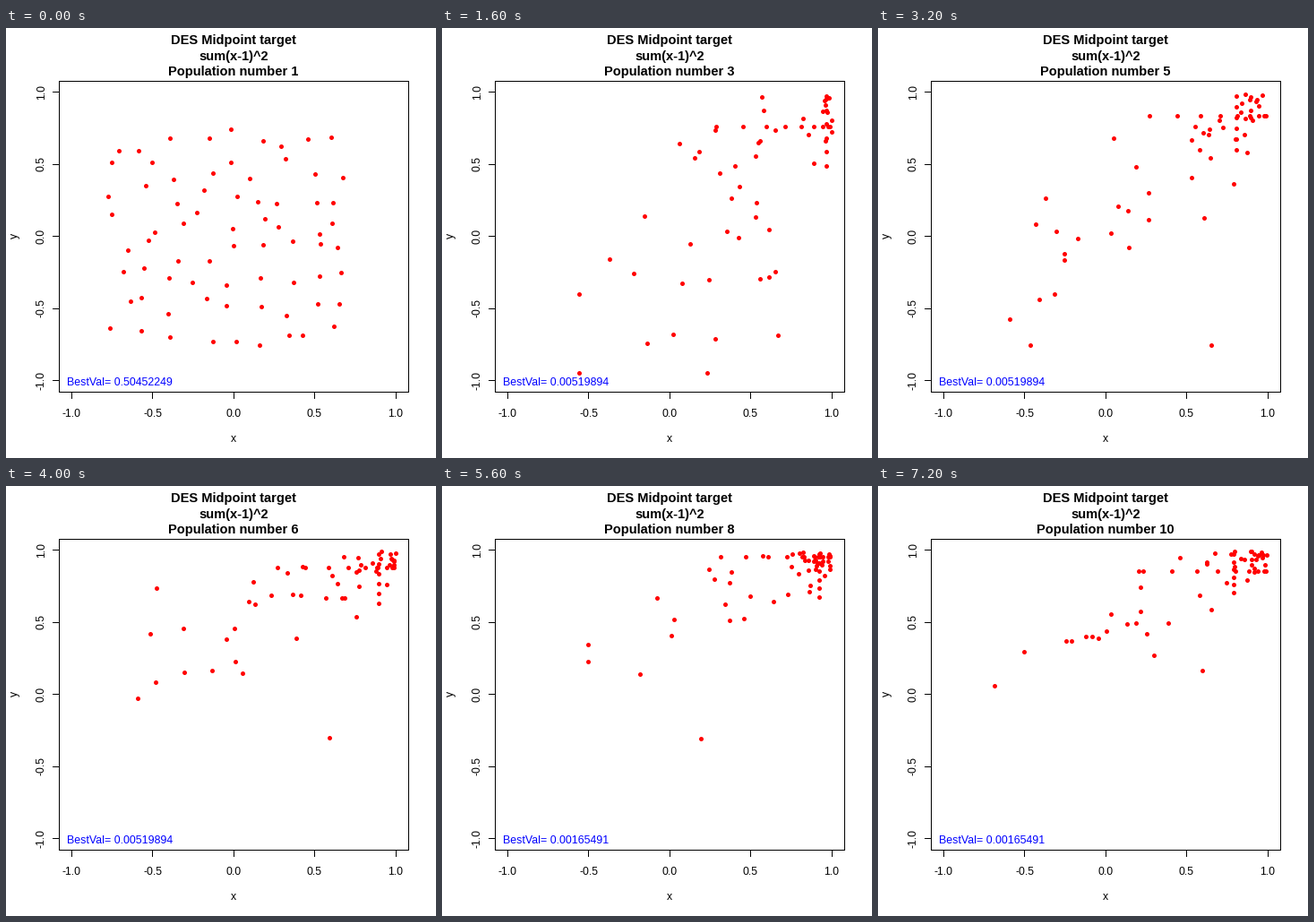
These frames come from a looping animation (480 by 480 pixels, 8 s). A matplotlib script:

```python
import numpy as np
import matplotlib.pyplot as plt
from matplotlib.animation import FuncAnimation

SIZE = 480
LEFT, RIGHT, TOP, BOTTOM = 59, 449, 59, 406
GOAL = np.array([434, 72])
plt.rcParams["font.family"] = "Liberation Sans"

# per generation: the best point, the leftmost point and one stray
KEYS = [
    ((389, 146), (79, 368), (406, 367)),
    ((428, 109), (152, 384), (374, 342)),
    ((418, 102), (81, 300), (230, 367)),
    ((399, 97), (146, 324), (371, 353)),
    ((415, 90), (146, 236), (360, 280)),
    ((432, 81), (167, 132), (271, 247)),
    ((420, 78), (162, 176), (288, 281)),
    ((408, 73), (172, 187), (334, 223)),
    ((396, 94), (129, 222), (361, 205)),
]


def first_population():
    """A loose grid of starting points."""
    rng = np.random.default_rng(1)
    grid = np.stack(np.meshgrid(np.linspace(125, 372, 9),
                                np.linspace(124, 342, 8)), axis=-1).reshape(-1, 2)
    return grid + rng.uniform(-13, 13, grid.shape)


def population(g):
    """Cloud thinning out from the goal, plus the row and column of the best point."""
    best, far, stray = KEYS[g - 2]
    rng = np.random.default_rng(g)
    width = 90 / g ** 0.5
    t = rng.uniform(0, 0.95, 45) ** (1 + g / 6)
    spread = width * (0.4 + t[:, None])
    offset = t[:, None] * (far - GOAL) + rng.normal(0, spread, (45, 2))
    cloud = GOAL + np.abs(offset) * (-1, 1)
    cloud = np.clip(cloud, (far[0], GOAL[1]), (GOAL[0], max(far[1], stray[1])))

    row_x = 432 - 0.45 * (GOAL[0] - far[0]) * np.linspace(0, 1, 9) ** 2
    col_y = np.linspace(75, 75 + 1.5 * width, 6)
    row = np.column_stack([row_x, np.full(9, best[1])])
    col = np.column_stack([np.full(6, best[0]), col_y])
    return np.vstack([cloud, row, col, far, stray])


populations = [first_population()] + [population(g) for g in range(2, 11)]


def best_value(i):
    if i == 0:
        return "0.50452249"
    return "0.00519894" if i < 6 else "0.00165491"


fig = plt.figure(figsize=(SIZE / 72, SIZE / 72), dpi=72, facecolor="white")
ax = fig.add_axes([0, 0, 1, 1])
ax.set_xlim(0, SIZE)
ax.set_ylim(SIZE, 0)
ax.axis("off")


def line(xs, ys):
    ax.plot(xs, ys, color="black", lw=1, antialiased=False, solid_capstyle="projecting")


def label(x, y, text, size=12.3, ha="center", **style):
    return ax.text(x, y, text, fontsize=size, ha=ha, va="baseline",
                   rotation_mode="anchor", **style)


line([LEFT, RIGHT, RIGHT, LEFT, LEFT], [TOP, TOP, BOTTOM, BOTTOM, TOP])
for v in np.linspace(-1, 1, 5):
    x, y = 254.4 + 180.9 * v, 232.8 - 160.9 * v
    line([int(x)] * 2, [BOTTOM, BOTTOM + 7])
    line([LEFT, LEFT - 7], [int(y)] * 2)
    label(x - 0.4, 433.7, f"{v:.1f}")
    label(42.8, y - 0.5, f"{v:.1f}", rotation=90)

label(253.5, 462.5, "x")
label(13, 232, "y", rotation=90)
label(254, 18, "DES Midpoint target", 14.6, weight="bold")
label(254, 36, "sum(x-1)^2", 14.6, weight="bold")
title = label(254, 53, "", 14.6, weight="bold")
best = label(67.5, 399.3, "", size=12.4, ha="left", color="blue")
dots = ax.scatter([], [], s=25, color="red", linewidths=0)


def update(i):
    dots.set_offsets(np.round(populations[i]) + 0.5)
    title.set_text(f"Population number {i + 1}")
    best.set_text(f"BestVal= {best_value(i)}")
    return dots, title, best


anim = FuncAnimation(fig, update, frames=10, interval=800, repeat=True, repeat_delay=0)
plt.show()
```
